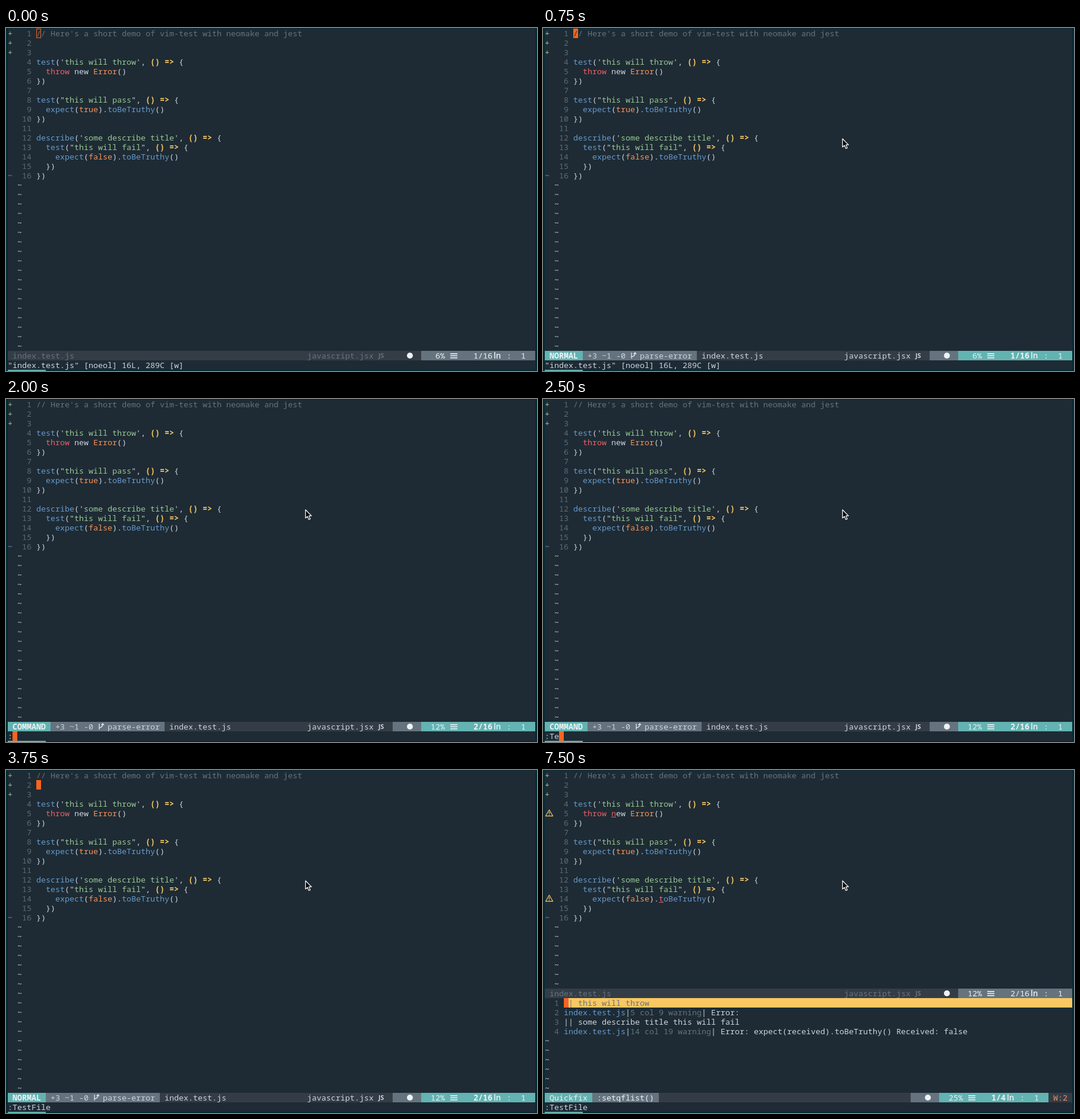
Write an HTML page that moves like this. It is 894x579 px and loops after 8000 ms.

```html
<!DOCTYPE html>
<html lang="en">
<head>
<meta charset="utf-8">
<title>Editor test run</title>
<style>
  html, body { margin: 0; width: 100%; height: 100%; overflow: hidden; background: #022b35; }
  svg { display: block; }
  text { font: 13.333px "Noto Sans Mono", monospace; white-space: pre; font-variant-ligatures: none; }
  .bold { font-weight: 700; }
  .sans { font: 700 10.5px "Open Sans", sans-serif; }
  .ln { font: 600 13.5px "Open Sans", sans-serif; }
</style>
</head>
<body>
<svg id="stage" width="894" height="579" viewBox="0 0 894 579"></svg>
<script>
const LOOP = 8000, CELL = 8, ROW = 16, LEFT = 3, TOP = 1, COLS = 111;
const C = {
  bg: '#1e2b34', edge: '#022b35', bar: '#343d46', mid: '#65737e', teal: '#62b3b2',
  f: '#cdd3de', w: '#eef2f5', g: '#65737e', n: '#5c6a74', b: '#6699cc', s: '#99c794',
  r: '#ec5f67', o: '#f99157', y: '#fac863', cursor: '#fb641c', dark: '#1e2b34'
};
const stage = document.getElementById('stage');

const X = col => LEFT + col * CELL;
const Y = row => TOP + row * ROW;
const esc = s => s.replace(/&/g, '&amp;').replace(/</g, '&lt;').replace(/>/g, '&gt;');
const rect = (x, y, w, h, fill) => `<rect x="${x}" y="${y}" width="${w}" height="${h}" fill="${fill}"/>`;
const cells = (row, col, n, fill) => rect(X(col), Y(row), n * CELL, ROW, fill);
const text = (x, y, s, fill, cls = '') => `<text x="${x}" y="${y}" fill="${fill}" class="${cls}">${esc(s)}</text>`;
const put = (row, col, s, fill, cls) => text(X(col), Y(row) + 13, s, fill, cls);

// Runs alternate colour key and text; an upper-case key means bold.
function runs(row, col, ...parts) {
  let out = '';
  for (let i = 0; i < parts.length; i += 2) {
    const key = parts[i].toLowerCase();
    out += put(row, col, parts[i + 1], C[key], key === parts[i] ? '' : 'bold');
    col += parts[i + 1].length;
  }
  return out;
}

const arrow = ['f', ', ', 'Y', '()', 'f', ' ', 'Y', '=>', 'f', ' {'];
const testHead = (pad, q, name, fn = 'test') =>
  ['f', pad, 'b', fn, 'f', '(' + q, 's', name, 'f', q, ...arrow];
const expectLine = (pad, value) =>
  ['f', pad, 'b', 'expect', 'f', '(', 'o', value, 'f', ').', 'b', 'toBeTruthy', 'f', '()'];
const code = [
  ['g', "// Here's a short demo of vim-test with neomake and jest"],
  [], [],
  testHead('', "'", 'this will throw'),
  ['f', '  ', 'r', 'throw', 'f', ' new ', 'o', 'Error', 'f', '()'],
  ['f', '})'],
  [],
  testHead('', '"', 'this will pass'),
  expectLine('  ', 'true'),
  ['f', '})'],
  [],
  testHead('', "'", 'some describe title', 'describe'),
  testHead('  ', '"', 'this will fail'),
  expectLine('    ', 'false'),
  ['f', '  })'],
  ['f', '})']
];

function tildes(from, to, col) {
  let out = '';
  for (let row = from; row < to; row++) out += put(row, col, '~', C.f);
  return out;
}

function buffer(rows) {
  let out = '';
  code.forEach((parts, i) => {
    out += put(i, 3, String(i + 1).padStart(2), C.n) + runs(i, 6, ...parts);
    if (i < 3) out += put(i, 0, '+', C.s);
  });
  return out + put(15, 0, '~', C.b) + tildes(16, rows, 2);
}

function block(row, col, ch = '') {
  return cells(row, col, 1, C.cursor) + put(row, col, ch, C.dark);
}

function warning(row, col, ch) {
  const y = Y(row);
  return `<path d="M10.5 ${y + 2.2}L16.6 ${y + 12.7}H4.4Z" fill="none" stroke="${C.y}" stroke-width="1.2" stroke-linejoin="round"/>`
    + rect(9.9, y + 5.5, 1.2, 3.6, C.y) + rect(9.9, y + 10, 1.2, 1.3, C.y)
    + cells(row, col, 1, C.bg) + put(row, col, ch, C.r)
    + rect(X(col), y + 14, CELL, 1, C.r);
}

function menuIcon(row, col) {
  return [4, 7.5, 11].map(d => rect(X(col) + 1, Y(row) + d, 12, 1.6, C.w)).join('');
}

function branchIcon(row, col) {
  const x = X(col), y = Y(row);
  return `<path d="M${x + 2} ${y + 3}V${y + 13}M${x + 2} ${y + 10}Q${x + 8} ${y + 9} ${x + 8} ${y + 4}M${x + 5.5} ${y + 5.5}L${x + 8} ${y + 3}L${x + 10} ${y + 5.5}" fill="none" stroke="${C.w}" stroke-width="1.2"/>`;
}

const dot = (row, x) => `<circle cx="${x}" cy="${Y(row) + 8}" r="5" fill="${C.w}"/>`;

function position(row, col, percent, place, bold) {
  const pad = place.length + 1;
  return put(row, col, percent, C.w) + menuIcon(row, col + 4)
    + put(row, col + 9, place, C.w, bold ? 'bold' : '')
    + text(X(col + 9 + place.length) + 2, Y(row) + 13, 'ln', C.w, 'ln')
    + put(row, col + 8 + pad + 3, ':', C.w) + put(row, col + 8 + pad + 6, '1', C.w);
}

function statusBar(row, mode, line) {
  const percent = line === 1 ? ' 6%' : '12%';
  const tone = mode ? C.f : C.g;
  let out = cells(row, 0, COLS, C.bar);
  let nameCol = 1;
  if (mode) {
    const w = mode.length + 2;
    nameCol = w + 25;
    out += cells(row, 0, w, C.teal) + put(row, 1, mode, C.w, 'bold')
      + cells(row, w, 24, C.mid) + put(row, w + 1, '+3 ~1 -0', C.f)
      + branchIcon(row, w + 10) + put(row, w + 12, 'parse-error', C.f)
      + cells(row, 81, 6, C.mid);
  }
  return out + cells(row, 87, 24, mode ? C.teal : C.mid)
    + put(row, nameCol, 'index.test.js', tone)
    + put(row, 63, 'javascript.jsx', tone)
    + text(X(78), Y(row) + 12, 'JS', tone, 'sans')
    + dot(row, 680) + position(row, 89, percent, line + '/16', !!mode);
}

function quickfix() {
  let out = cells(24, 4, 107, C.y) + runs(24, 5, 'g', '| this will throw')
    + cells(24, 4, 1, C.cursor) + put(24, 4, '|', C.r);
  for (let i = 0; i < 4; i++) out += put(24 + i, 2, String(i + 1), C.n);
  return out
    + runs(25, 4, 'b', 'index.test.js', 'f', '|', 'g', '5 col 9 warning', 'f', '| Error:')
    + runs(26, 4, 'f', '|| some describe title this will fail')
    + runs(27, 4, 'b', 'index.test.js', 'f', '|', 'g', '14 col 19 warning',
      'f', '| Error: expect(received).toBeTruthy() Received: false')
    + tildes(28, 34, 0)
    + cells(34, 0, COLS, C.bar)
    + cells(34, 0, 10, C.teal) + put(34, 1, 'Quickfix', C.w)
    + cells(34, 10, 14, C.mid) + put(34, 11, ':setqflist()', C.w)
    + cells(34, 77, 6, C.mid) + dot(34, 648)
    + cells(34, 83, 23, C.teal) + position(34, 85, '25%', '1/4', true)
    + put(34, 107, 'W:2', C.o);
}

function pointer(x, y) {
  return `<path transform="translate(${x} ${y})" d="M0 0V14L3.2 11.1L5.5 16.5L8 15.4L5.7 10.2H10Z" fill="#080808" stroke="#fff" stroke-width="1.2" stroke-linejoin="round"/>`;
}

const typed = ['', 'T', 'Te', 'Test', 'TestF', 'TestFi', 'TestFile'];

function draw(t) {
  const split = t >= 5750;
  const focused = t >= 750;
  const typing = t >= 2000 && t < 3750;
  const line = t < 1750 ? 1 : 2;
  const barRow = split ? 23 : 34;
  const mode = !focused || split ? '' : typing ? 'COMMAND' : 'NORMAL';

  let out = rect(0, 0, 894, 579, C.edge) + rect(LEFT, TOP, 888, 576, C.bg)
    + rect(LEFT, 577, 64, 2, C.teal) + buffer(barRow);

  if (!focused) out += `<rect x="51.5" y="1.5" width="7" height="15" fill="none" stroke="${C.cursor}"/>`;
  else if (!split && !typing) out += block(line - 1, 6, line === 1 ? '/' : '');

  out += statusBar(barRow, mode, line);
  if (split) out += warning(4, 14, 'n') + warning(13, 24, 't') + quickfix();

  if (t < 2000) out += put(35, 0, '"index.test.js" [noeol] 16L, 289C [w]', C.f);
  else {
    const cmd = ':' + (typing ? typed[Math.floor((t - 2000) / 250)] : 'TestFile');
    out += put(35, 0, cmd, C.f);
    if (typing) out += block(35, cmd.length);
  }

  if (t >= 500) out += pointer(504.3, 187);
  else if (t >= 250) out += pointer(820.3, 105);
  stage.innerHTML = out;
}

// Every change falls on a quarter-second step.
let shown = -1;
function tick(now) {
  const step = Math.floor((now % LOOP) / 250);
  if (step !== shown) draw((shown = step) * 250);
  requestAnimationFrame(tick);
}
draw(0);
requestAnimationFrame(tick);
</script>
</body>
</html>
```
